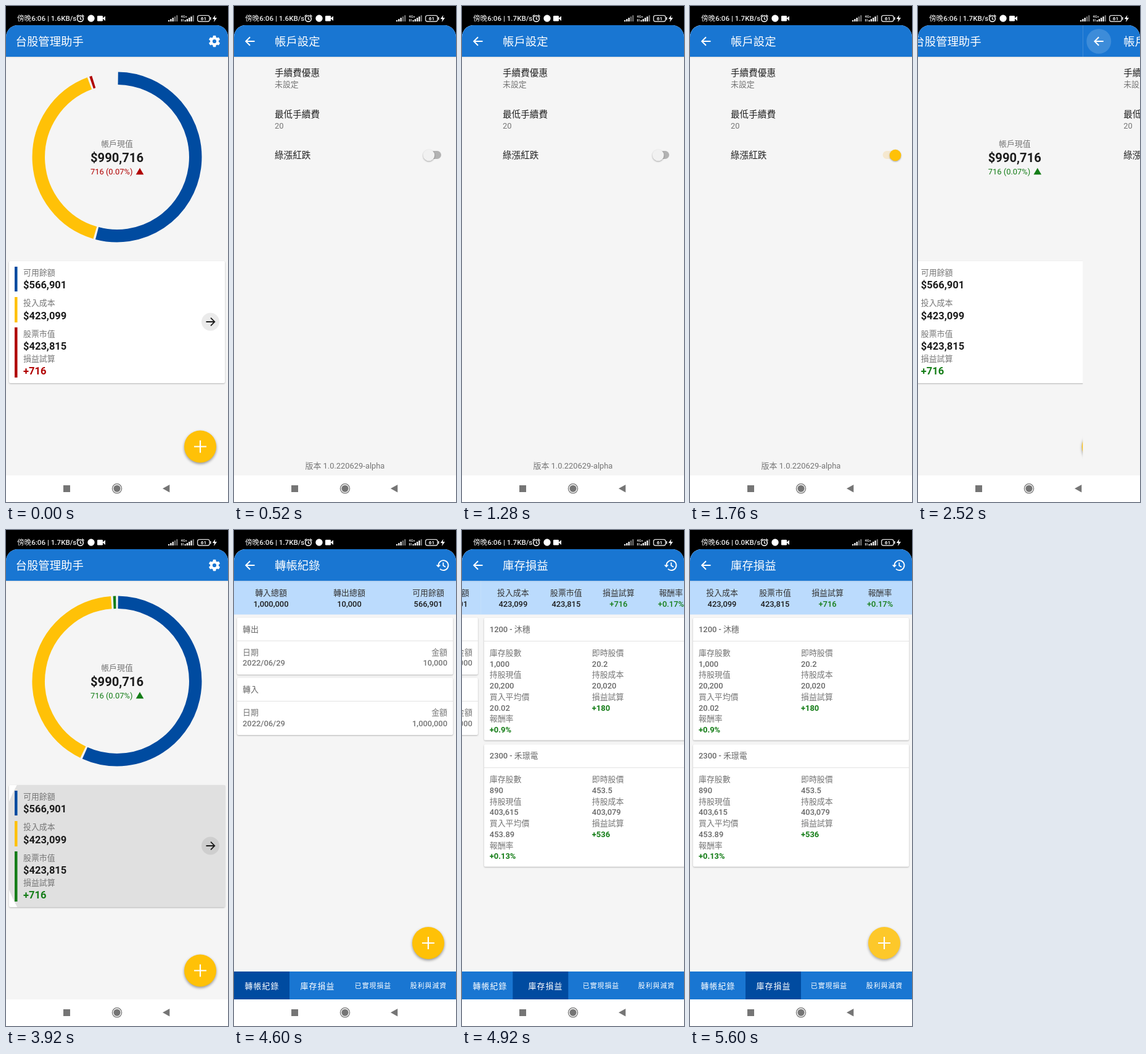
Write an HTML page that moves like this. It is 360 px wide and 801 px high and loops after 5.64 s.

```html
<!DOCTYPE html>
<html lang="zh-Hant">
<head>
<meta charset="utf-8">
<title>台股管理助手</title>
<style>
html, body { margin: 0; width: 100%; height: 100%; overflow: hidden; background: #000; }
svg { display: block; width: 100%; height: 100%; }
text { font-family: Roboto, "Noto Sans CJK TC", "Noto Sans CJK", sans-serif; white-space: pre; }
.line { fill: none; stroke: #fff; stroke-width: 2; }
.card { fill: #fff; filter: drop-shadow(0 1px 1.2px #0004); }
.fab { fill: #ffc107; filter: drop-shadow(0 2px 2px #0006); }
</style>
</head>
<body>
<svg id="stage" viewBox="0 0 360 801"></svg>
<script>
const LOOP = 5640, STEP = 40;
const BLUE = '#1976d2', NAVY = '#004ba0', AMBER = '#ffc107', RED = '#b00000', GREEN = '#147d17';
const GREY = '#757575', INK = '#1c1c1c';

const text = (x, y, str, { size = 12.9, fill = GREY, weight = 400, anchor = 'start', extra = '' } = {}) =>
  `<text x="${x}" y="${y}" font-size="${size}" fill="${fill}" font-weight="${weight}" text-anchor="${anchor}" ${extra}>${str}</text>`;
const rect = (x, y, w, h, fill, extra = '') =>
  `<rect x="${x}" y="${y}" width="${w}" height="${h}" fill="${fill}" ${extra}/>`;
const circle = (x, y, r, fill, extra = '') => `<circle cx="${x}" cy="${y}" r="${r}" fill="${fill}" ${extra}/>`;
const path = (d, fill, extra = '') => `<path d="${d}" fill="${fill}" ${extra}/>`;
const line = (d, extra = '') => `<path class="line" d="${d}" ${extra}/>`;
const card = (y, h, x = 5) => `<rect class="card" x="${x}" y="${y}" width="350" height="${h}" rx="2"/>`;

const appBar = (x, title, icon, id = '') =>
  rect(0, 31, 360, 51, BLUE) + rect(0, 82, 360, 1.5, '#0001') +
  text(x, 64, title, { size: 18.4, fill: '#fff', extra: id }) + icon;
const backIcon = line('M33.5 57H19.5M26 50.2L19.2 57L26 63.8');
const gearIcon = `<g transform="translate(338 57)">` +
  [0, 60, 120].map(a => rect(-2.4, -9.2, 4.8, 18.4, '#fff', `rx="1" transform="rotate(${a})"`)).join('') +
  circle(0, 0, 5, 'none', 'stroke="#fff" stroke-width="4"') + circle(0, 0, 3.1, BLUE) + '</g>';
const historyIcon = line('M331.5 57A8 8 0 1 1 334 62.9M339.3 52.5V57.5L343 59.8', 'style="stroke-width:1.8"') +
  path('M327.6 56.5H335.2L331.4 60.6Z', '#fff');
const fab = (id, y) => `<g id="${id}"><circle class="fab" cx="315" cy="${y}" r="26"/>` +
  line(`M305 ${y}H325M315 ${y - 10}V${y + 10}`, 'style="stroke-width:2.2"') + '</g>';
const page = (id, body) => `<g id="${id}">${rect(0, 31, 360, 727, '#f5f5f5')}${body}</g>`;

function homeScreen() {
  const amount = (y, str, fill = INK, cls = '') =>
    text(28, y, str, { size: 16.5, weight: 700, fill, extra: cls });
  return page('home',
    appBar(15.5, '台股管理助手', gearIcon) +
    circle(338, 57, 20, '#fff', 'id="gearTap" opacity="0"') +
    [NAVY, AMBER, RED].map((c, i) =>
      `<path class="slice" fill="none" stroke="${c}" stroke-width="20.5" ${i === 2 ? 'data-gain="stroke"' : ''}/>`).join('') +
    text(180, 227, '帳戶現值', { anchor: 'middle' }) +
    text(180, 252, '$990,716', { size: 20.2, weight: 700, fill: INK, anchor: 'middle' }) +
    text(137, 272, '716 (0.07%)', { extra: 'data-gain="fill"' }) +
    path('M217 261.5L223.3 272.3H210.7Z', RED, 'data-gain="fill"') +
    card(412, 197) +
    circle(192, 510, 0, '#e0e0e0', 'id="cardTap" clip-path="url(#cardClip)"') +
    rect(14, 421, 4.5, 40, NAVY) + rect(14, 470, 4.5, 41, AMBER) +
    rect(14, 519, 4.5, 81, RED, 'data-gain="fill"') +
    text(28, 435, '可用餘額') + amount(456, '$566,901') +
    text(28, 484, '投入成本') + amount(505.5, '$423,099') +
    text(28, 534, '股票市值') + amount(555, '$423,815') +
    text(28, 574, '損益試算') + amount(595, '+716', RED, 'data-gain="fill"') +
    circle(331.5, 510, 14.5, '#000', 'opacity=".08"') +
    line('M324.5 510H338M332 503.7L338.3 510L332 516.3', 'style="stroke:#1c1c1c;stroke-width:1.8"') +
    fab('homeFab', 711.5));
}

function settingsScreen() {
  const item = (y, str) => text(66, y, str, { size: 14.6, fill: '#222' });
  return page('settings',
    appBar(66, '帳戶設定', backIcon) +
    circle(26, 57, 20, '#fff', 'id="backTap" opacity="0"') +
    item(112.5, '手續費優惠') + text(66, 131, '未設定') +
    item(179.5, '最低手續費') + text(66, 197.5, '20') +
    item(246, '綠漲紅跌') +
    rect(312.5, 234, 23.5, 13, '#b2b2b2', 'id="track" rx="6.5"') +
    circle(316, 241, 9.3, '#f1f1f1', 'id="thumb" style="filter:drop-shadow(0 1px 1px #0005)"') +
    text(180, 747, '版本 1.0.220629-alpha', { anchor: 'middle' }));
}

function summary(centers, columns) {
  return rect(0, 82, 360, 54.5, '#bbdbfd') + columns.map(([name, value], i) =>
    text(centers[i], 106, name, { fill: '#333', anchor: 'middle' }) +
    text(centers[i], 123.5, value, { fill: value[0] === '+' ? GREEN : INK, weight: 500, anchor: 'middle' })).join('');
}

function stockCard(y, title, fields) {
  const names = ['庫存股數', '即時股價', '持股現值', '持股成本', '買入平均價', '損益試算', '報酬率'];
  return card(y, 197.5) + text(14, y + 23, title, { weight: 500, fill: '#686868' }) +
    rect(5, y + 37, 350, 1, '#e2e2e2') +
    names.map((name, i) => {
      const x = i % 2 ? 180 : 14, top = y + 61 + (i >> 1) * 35.4, gain = fields[i][0] === '+';
      return text(x, top, name) +
        text(x, top + 17.7, fields[i], { weight: gain ? 700 : 500, fill: gain ? GREEN : '#686868' });
    }).join('');
}

function transferCard(y, kind, amount) {
  const right = { anchor: 'end' };
  return card(y, 92) + text(14, y + 23, kind, { weight: 500, fill: '#686868' }) +
    rect(5, y + 37, 350, 1, '#e2e2e2') +
    text(14, y + 60, '日期') + text(14, y + 77.5, '2022/06/29', { weight: 500 }) +
    text(346, y + 60, '金額', right) + text(346, y + 77.5, amount, { ...right, weight: 500 });
}

function ledgerScreen() {
  const tabs = ['轉帳紀錄', '庫存損益', '已實現損益', '股利與減資'];
  return page('ledger',
    `<g id="transfers">${summary([60, 187, 315], [['轉入總額', '1,000,000'], ['轉出總額', '10,000'], ['可用餘額', '566,901']])}` +
    transferCard(141.5, '轉出', '10,000') + transferCard(239, '轉入', '1,000,000') + '</g>' +
    `<g id="stocks">${summary([52, 138, 223, 308], [['投入成本', '423,099'], ['股票市值', '423,815'], ['損益試算', '+716'], ['報酬率', '+0.17%']])}` +
    stockCard(142, '1200 - 沐穗', ['1,000', '20.2', '20,200', '20,020', '20.02', '+180', '+0.9%']) +
    stockCard(346.3, '2300 - 禾璟電', ['890', '453.5', '403,615', '403,079', '453.89', '+536', '+0.13%']) + '</g>' +
    appBar(66, '轉帳紀錄', backIcon + historyIcon, 'id="ledgerTitle"') +
    fab('ledgerFab', 667) +
    rect(0, 713, 360, 45, BLUE) + rect(0, 713, 90, 45, NAVY, 'id="tabMark"') +
    tabs.map((name, i) => {
      const long = name.length > 4;
      return text(45.5 + i * 90, long ? 739.8 : 740.5, name, {
        size: long ? 10.9 : 12.9, fill: '#fff', weight: 500, anchor: 'middle',
        extra: `letter-spacing="${long ? 1 : 1.1}"` });
    }).join(''));
}

function statusBar() {
  const bars = (x, lit) => [2, 4, 6, 8, 10].map((h, i) =>
    rect(x + i * 3.3, 25 - h, 2.2, h, i < lit ? '#fff' : '#777')).join('');
  return text(18, 24.3, '傍晚6:06 | <tspan id="speed">1.6</tspan>KB/s', { size: 11.6, fill: '#eee', weight: 500 }) +
    circle(120.5, 20.5, 4.8, 'none', 'stroke="#fff" stroke-width="1.5"') +
    line('M120.5 17.8V21L122.7 22M114.5 17L117.6 14.3M126.5 17L123.4 14.3', 'style="stroke-width:1.3"') +
    circle(138, 20, 5.7, '#fff') +
    rect(148, 15.8, 9, 8.6, '#fff', 'rx="1.2"') + path('M156.5 20L161 16.3V24Z', '#fff') +
    bars(263, 3) + text(283.5, 18.5, '4G+', { size: 5.6, fill: '#fff', weight: 500 }) +
    line('M284.5 21V25M287 21V25', 'style="stroke-width:1"') + bars(289.5, 4) +
    rect(310.6, 15.4, 19.5, 9.6, 'none', 'rx="3" stroke="#ddd" stroke-width="1.4"') + rect(331, 18, 1.6, 4.4, '#ddd') +
    text(320.4, 23.2, '61', { size: 8, fill: '#fff', weight: 700, anchor: 'middle' }) +
    path('M339.5 14.5L334.8 21H338L337 26L342 19H338.6Z', '#fff');
}

const navBar = rect(0, 758, 360, 43, '#fff') + rect(93, 774, 11, 11, GREY) +
  circle(180, 779.3, 7.6, 'none', `stroke="${GREY}" stroke-width="1.3"`) + circle(180, 779.3, 5.6, GREY) +
  path('M254 779.3L265.3 773V785.6Z', GREY);

document.getElementById('stage').innerHTML =
  `<defs><clipPath id="cardClip">${rect(5, 412, 351, 197, '#000', 'rx="2"')}</clipPath>
   <clipPath id="window"><path d="M0 801V50A19 19 0 0 1 19 31H341A19 19 0 0 1 360 50V801Z"/></clipPath></defs>` +
  rect(0, 0, 360, 801, '#000') + statusBar() +
  `<g clip-path="url(#window)">${homeScreen() + settingsScreen() + ledgerScreen() + navBar}</g>`;

const $ = id => document.getElementById(id);
const slices = [...document.querySelectorAll('.slice')];
const gains = [...document.querySelectorAll('[data-gain]')];
const progress = (t, a, b) => Math.min(1, Math.max(0, (t - a) / (b - a)));
const easeOut = p => 1 - (1 - p) ** 3;
const easeInOut = (p, n) => p < .5 ? (2 * p) ** n / 2 : 1 - (2 - 2 * p) ** n / 2;
const set = (id, attrs) => Object.entries(attrs).forEach(([k, v]) => $(id).setAttribute(k, v));
const shift = (id, x) => set(id, { transform: `translate(${x} 0)` });
const pulse = (t, a, b) => Math.sin(Math.PI * progress(t, a, b)) * .2;

function drawRing(phase) {
  const bounds = [0, 204.9, 356.6, 360], gap = .75, r = 127.2;
  const point = deg => {
    const a = deg * Math.PI / 180;
    return `${180 + r * Math.sin(a)} ${244 - r * Math.cos(a)}`;
  };
  slices.forEach((slice, i) => {
    const from = bounds[i] * phase + gap, to = bounds[i + 1] * phase - gap;
    slice.setAttribute('d', to > from
      ? `M${point(from)}A${r} ${r} 0 ${to - from > 180 ? 1 : 0} 1 ${point(to)}` : '');
  });
}

function render(t) {
  const open = easeOut(progress(t, 280, 480)), close = easeOut(progress(t, 2440, 2660));
  const settings = open - close, ledger = easeOut(progress(t, 4000, 4240));
  shift('home', -90 * (settings + ledger));
  shift('settings', 360 * (1 - settings));
  shift('ledger', 360 * (1 - ledger));

  const flipped = t >= 2360;
  gains.forEach(el => el.setAttribute(el.dataset.gain, flipped ? GREEN : RED));
  const ringTime = flipped ? progress(t, 2564, 3264) : progress(t, -594, 106);
  drawRing(easeInOut(ringTime, 2));

  set('gearTap', { opacity: pulse(t, 160, 440) });
  set('backTap', { opacity: pulse(t, 2320, 2600) });
  set('cardTap', { r: t < 3640 ? 0 : 50 + 150 * (t - 3640) / 280 });

  const on = easeInOut(progress(t, 1240, 1400), 2);
  set('thumb', { cx: 316 + 17 * on, fill: on > .5 ? AMBER : '#f1f1f1' });
  set('track', { fill: on > .5 ? '#f5e8cf' : '#b2b2b2' });

  const swipe = easeInOut(progress(t, 4600, 5043), 3);
  shift('transfers', -360 * swipe);
  shift('stocks', 360 * (1 - swipe));
  set('tabMark', { x: 90 * swipe });
  $('ledgerTitle').textContent = swipe > .5 ? '庫存損益' : '轉帳紀錄';

  const shown = t < 5000 ? 1 - progress(t, 4600, 4720) : progress(t, 5480, 5600);
  set('ledgerFab', {
    transform: `translate(315 667) scale(${shown}) translate(-315 -667)`,
    opacity: t < 5000 ? shown : shown * .85
  });
  $('speed').textContent = t < 720 ? '1.6' : t < 5200 ? '1.7' : '0.0';
}

const start = performance.now();
function tick() {
  const t = (performance.now() - start) % LOOP;
  render(t < 80 ? 0 : Math.floor(t / STEP) * STEP);
  requestAnimationFrame(tick);
}
tick();
</script>
</body>
</html>
```
